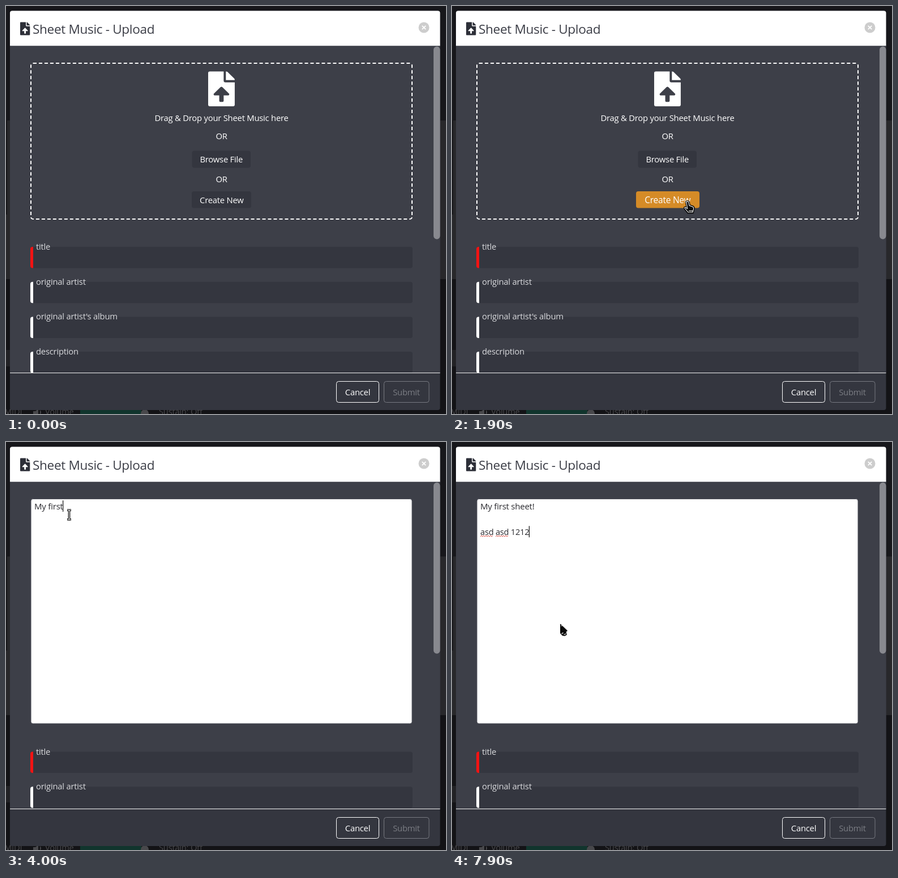
Write an HTML page that moves like this. It is 777 px wide and 720 px high and loops after 8000 ms.

```html
<!DOCTYPE html>
<html lang="en">
<head>
<meta charset="utf-8">
<title>Sheet Music - Upload</title>
<style>
html, body { margin: 0; width: 100%; height: 100%; overflow: hidden; background: #17171b; }
svg { display: block; width: 777px; height: 720px; }
text { font: 15px "Open Sans", "Noto Sans", sans-serif; letter-spacing: -.015em; white-space: pre; }
.mid { text-anchor: middle; fill: #fff; font-weight: 500; font-size: 14.8px; }
.label { font-size: 14.8px; fill: #d9dadd; }
.dim { fill: #48484b; font-size: 14.7px; }
.zone { box-sizing: border-box; width: 675px; height: 277px; border: 2px dashed #fff; border-radius: 5px; }
</style>
</head>
<body>
<svg viewBox="0 0 777 720">
  <defs>
    <path id="file" fill-rule="evenodd" d="M24 0H224V136Q224 160 248 160H384V488Q384 512 360 512H24Q0 512 0 488V24Q0 0 24 0ZM180 229Q192 219 204 229L300 325C311 335 303 352 289 352H224V432Q224 448 208 448H176Q160 448 160 432V352H95C81 352 73 335 84 325ZM256 0Q270 0 279 7L377 105Q384 112 384 128H256Z"/>
    <clipPath id="bodyClip"><rect x="7" y="71" width="760" height="576"/></clipPath>
  </defs>

  <!-- dimmed page behind the dialog -->
  <rect width="777" height="720" fill="#17171b"/>
  <rect y="482" width="777" height="238" fill="#131316"/>
  <rect y="202" width="777" height="280" fill="#28282b"/>
  <rect y="202" width="2" height="166" fill="#151518"/>
  <rect y="607" width="8" height="29" fill="#222225"/>
  <text class="dim" x="-3" y="721">MIDI</text>
  <path d="M48 715h4l5-4v10h-9zM60 713q4 4 0 8" fill="#48484b"/>
  <text class="dim" x="69" y="721">Volume</text>
  <rect x="131" y="712" width="108" height="8" fill="#11352d"/>
  <circle cx="245" cy="719" r="7" fill="#48484b"/>
  <text class="dim" x="270" y="721">Sustain: Off</text>

  <!-- dialog -->
  <rect x="7" y="8.500" width="759.500" height="704.500" rx="4" fill="#34363f"/>
  <path d="M7 70.500V12.500Q7 8.500 11 8.500H762.500Q766.500 8.500 766.500 12.500V70.500Z" fill="#fff"/>
  <rect x="7" y="70.500" width="759.500" height="576.500" fill="#3d3f48"/>
  <use href="#file" transform="translate(25 28.500) scale(.045)" fill="#2d2f38"/>
  <text x="47" y="49" style="font-size:22.6px" fill="#3b3d46">Sheet Music - Upload</text>
  <circle cx="738" cy="38" r="9.500" fill="#cdcdcd"/>
  <path d="M734.800 34.800l6.400 6.400m0-6.400l-6.400 6.400" stroke="#fff" stroke-width="1.800"/>

  <g clip-path="url(#bodyClip)">
    <g id="drop">
      <foreignObject x="43" y="99.500" width="676" height="278"><div xmlns="http://www.w3.org/1999/xhtml" class="zone"></div></foreignObject>
      <use href="#file" transform="translate(357 115.500) scale(.1222 .12)" fill="#fff"/>
      <text class="mid" x="380.500" y="203">Drag &amp; Drop your Sheet Music here</text>
      <text class="mid" x="380.500" y="235">OR</text>
      <text class="mid" x="380.500" y="311">OR</text>
      <g id="browse">
        <rect x="328.500" y="255.500" width="103.500" height="30" rx="4"/>
        <text class="mid" x="380.300" y="276">Browse File</text>
      </g>
      <g id="create">
        <rect y="327" height="29.500" rx="4"/>
        <text class="mid" x="380.800" y="347.500">Create New</text>
      </g>
    </g>
    <g id="editor">
      <rect x="44" y="100.500" width="673" height="396.500" rx="3.500" fill="#fff" stroke="#4b4d57"/>
      <text id="line1" x="50" y="118.500" fill="#2b2b30"></text>
      <text id="line3" x="50" y="164" fill="#2b2b30" style="font-size:14.6px"></text>
      <path id="wave1" fill="none" stroke="#d9493f"/>
      <path id="wave2" fill="none" stroke="#d9493f"/>
      <rect id="caret" width="1.200" height="20" fill="#111"/>
    </g>
    <g id="fields"></g>
  </g>
  <rect id="thumb" x="755" y="71.500" width="11.500" rx="5.700" fill="#88898f"/>
  <rect x="7" y="647" width="759.500" height="1" fill="#f2f2f2"/>
  <rect x="583.500" y="662.500" width="75" height="37" rx="4" fill="none" stroke="#fff"/>
  <text class="mid" x="621" y="687">Cancel</text>
  <rect x="667.500" y="662.500" width="79.500" height="37" rx="4" fill="none" stroke="#777981"/>
  <text class="mid" x="707" y="687" style="fill:#7b7d84">Submit</text>

  <!-- pointers -->
  <g id="hand">
    <path d="M-2.500 0Q0 -2.500 2.500 0.500L3.500 6L10 8.500Q12 10 11 13L9.500 19.500H0.500L-5 12.500Q-7 9 -3.500 9.500L-1 11.500Z" fill="#000" stroke="#000" stroke-width="2.600"/>
    <path d="M-2 0Q0 -2 2 0.500L3 6.500L9.500 9Q11 10 10.500 13L9 18.500H1L-4.500 12Q-6 9.500 -3.500 10L-0.500 12Z" fill="#0b0b0b" stroke="#fff" stroke-width="1.100"/>
    <path d="M2 16h7" stroke="#fff"/>
  </g>
  <g id="arrow">
    <path d="M0 0L12 11.500L9.500 13.500L11 18.500Q7 22 3 19.500L0 16Z" fill="#0a0a0a" stroke="#0a0a0a" stroke-linejoin="round"/>
    <path d="M2 17l3-2M6 18.500l4-1.500M1 2.500l2 .5" stroke="#fff" stroke-width="1.200"/>
  </g>
  <g id="beam" fill="none">
    <path d="M-3.500 -8.300H-1Q0 -8 0 -6.500V6.500Q0 8 -1 8.300H-3.500M3.500 -8.300H1Q0 -8 0 -6.500M0 6.500Q0 8 1 8.300H3.500" stroke="#000" stroke-width="3.600"/>
    <path d="M-3 -8.300H-1Q0 -8 0 -6.500V6.500Q0 8 -1 8.300H-3M3 -8.300H1Q0 -8 0 -6.500M0 6.500Q0 8 1 8.300H3" stroke="#fff" stroke-width="1.200"/>
  </g>
</svg>
<script>
const LOOP = 8000, STEP = 100;
const $ = id => document.getElementById(id);
const show = (el, on) => el.setAttribute("visibility", on ? "visible" : "hidden");
const clamp = v => Math.max(0, Math.min(1, v));

const IDLE = "#34363f", HOVER = "#d58b27";
const LINE1 = "My first sheet!", LINE3 = "asd asd 1212";

// pointer stops: time, x, y
const STOPS = [
  [200, 440, 740], [900, 405, 272], [1000, 404.5, 270], [1200, 406, 282],
  [1700, 416, 345.5], [1900, 416, 345.5], [2000, 404, 346], [2400, 404, 346],
  [3200, 111.5, 128.5], [7600, 111.5, 128.5], [7900, 191.5, 321.5]
];

$("fields").innerHTML = ["title", "original artist", "original artist's album", "description"]
  .map((name, i) => {
    const y = 425 + i * 61.7;
    return `<rect x="43" y="${y}" width="675" height="37.5" rx="4" fill="${IDLE}"/>
      <path d="M48 ${y}v37.500h-1q-4 0 -4 -4v-29.500q0 -4 4 -4z" fill="${i ? "#fff" : "#f21313"}"/>
      <text class="label" x="53" y="${y + 5}">${name}</text>`;
  }).join("");

function wave(x, width) {
  let d = `M${x} 167`;
  for (let i = 2; i <= width; i += 2) d += `L${x + i} ${i % 4 ? 165 : 167}`;
  return d;
}
$("wave1").setAttribute("d", wave(50, 23));
$("wave2").setAttribute("d", wave(77, 23));

function pointerAt(t) {
  let a = STOPS[0];
  for (const b of STOPS) {
    if (t <= b[0]) {
      const u = b === a ? 0 : (t - a[0]) / (b[0] - a[0]);
      const k = u * u * (3 - 2 * u);
      return [a[1] + (b[1] - a[1]) * k, a[2] + (b[2] - a[2]) * k];
    }
    a = b;
  }
  return [a[1], a[2]];
}

function drawButton(id, hot) {
  $(id).firstElementChild.setAttribute("fill", hot ? HOVER : IDLE);
}

function drawPointer(t, x, y, hot) {
  const kind = t >= 3000 && t <= 7600 ? "beam" : hot ? "hand" : "arrow";
  for (const id of ["hand", "arrow", "beam"]) show($(id), id === kind);
  $(kind).setAttribute("transform", `translate(${x} ${y})`);
}

function drawText(t) {
  const n1 = Math.round(15 * clamp((t - 3400) / 1200));
  const n3 = t < 5700 ? 0 : Math.floor(1 + 11 * clamp((t - 5700) / 1700) + 1e-6);
  $("line1").textContent = LINE1.slice(0, n1);
  $("line3").textContent = LINE3.slice(0, n3);
  show($("wave1"), n3 > 3);
  show($("wave2"), n3 > 7);

  const row = t < 4800 ? 0 : t < 5000 ? 1 : 2;
  const typed = row === 0 ? $("line1") : row === 2 ? $("line3") : null;
  const width = typed && typed.textContent ? typed.getComputedTextLength() : 0;
  $("caret").setAttribute("x", 49.4 + width);
  $("caret").setAttribute("y", 103 + row * 22.6);
  show($("caret"), t >= 3400 && !(t >= 5500 && t < 5700));
}

function draw(now) {
  const t = Math.floor((now % LOOP) / STEP) * STEP;
  const editing = t >= 2000;
  const [x, y] = pointerAt(t);
  const onBrowse = !editing && y >= 256 && y <= 286;
  const onCreate = !editing && y >= 327 && y <= 357;

  $("drop").style.display = editing ? "none" : "";
  $("editor").style.display = editing ? "" : "none";
  $("fields").setAttribute("transform", `translate(0 ${editing ? 121.5 : 0})`);
  $("thumb").setAttribute("height", editing ? 302 : 340);

  drawButton("browse", onBrowse);
  drawButton("create", onCreate);
  const pressed = t === 1900, [box, label] = $("create").children;
  box.setAttribute("x", pressed ? 325 : 328);
  box.setAttribute("width", pressed ? 112 : 105);
  label.style.fontSize = pressed ? "15.5px" : "14.8px";

  if (editing) drawText(t);
  else for (const id of ["wave1", "wave2", "caret"]) show($(id), false);
  drawPointer(t, x, y, onBrowse || onCreate);
}

const start = performance.now();
function tick() {
  draw(performance.now() - start);
  requestAnimationFrame(tick);
}
tick();
</script>
</body>
</html>
```
